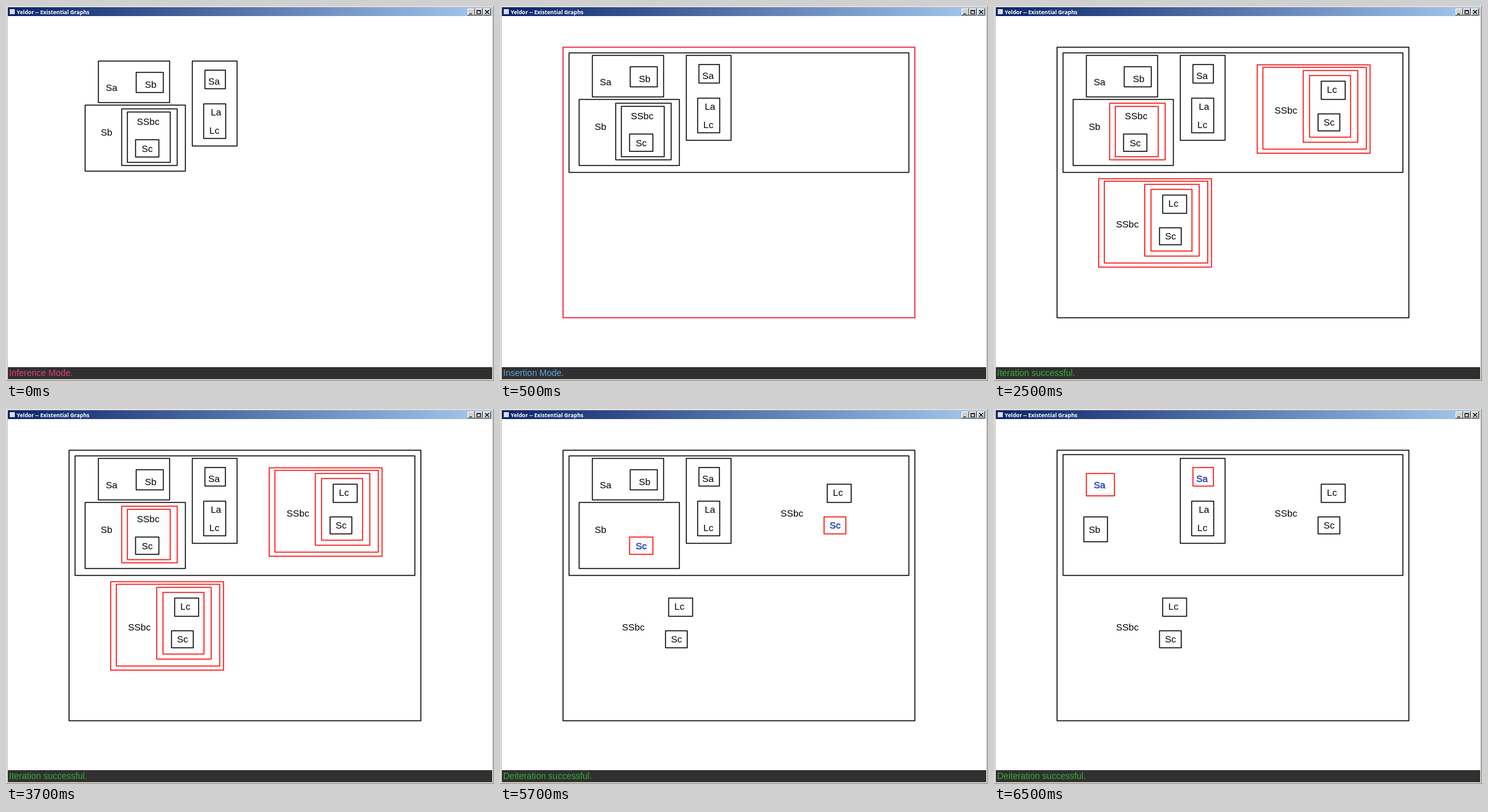
Recreate the animation shown at these times as an HTML page. Size 774 by 596 pixels, loop 8 s.

```html
<!DOCTYPE html>
<html lang="en">
<head>
<meta charset="utf-8">
<title>Existential Graphs</title>
<style>
  html, body { margin: 0; width: 100%; height: 100%; overflow: hidden; background: #d4d0c8; }
  svg { display: block; width: 774px; height: 596px; }
  .box { fill: none; stroke-width: 1.5; stroke-linejoin: round; }
  .label { font: 15px "Liberation Sans", Arial, sans-serif; text-anchor: middle; }
  .status { font: 14px "Liberation Sans", Arial, sans-serif; }
  .title { font: bold 8.6px "Open Sans", sans-serif; fill: #fff; }
  .scene { visibility: hidden; }
</style>
</head>
<body>
<svg id="stage" viewBox="0 0 774 596">
  <defs>
    <linearGradient id="bar">
      <stop offset="0" stop-color="#0a246a"/>
      <stop offset="1" stop-color="#a6caf0"/>
    </linearGradient>
  </defs>
  <rect width="774" height="596" fill="#d4d0c8"/>
  <path d="M.5 596V.5H774" fill="none" stroke="#e8e5df"/>
  <path d="M773.5 0V595.5H0" fill="none" stroke="#8a8780"/>
  <rect x="3" y="2" width="768" height="14" fill="url(#bar)"/>
  <rect x="6" y="5" width="8" height="8" fill="#d8dee8"/>
  <text class="title" x="17" y="13">Yeldor -- Existential Graphs</text>
  <g id="buttons"></g>
  <rect x="3" y="16" width="768" height="558" fill="#fff"/>
  <rect x="3" y="574" width="768" height="19" fill="#303030"/>
</svg>
<script>
const NS = "http://www.w3.org/2000/svg";
const stage = document.getElementById("stage");
const BLACK = "#000", RED = "#f00", CRIMSON = "#f4002a", BLUE = "#1c3cac", GREEN = "#30b034";
const LOOP = 8000;
let layer;

function add(parent, tag, attrs, text) {
  const el = document.createElementNS(NS, tag);
  for (const key in attrs) el.setAttribute(key, attrs[key]);
  if (text) el.textContent = text;
  return parent.appendChild(el);
}

// Corners are given as left, top, right, bottom.
function box(l, t, r, b, color = BLACK) {
  add(layer, "rect", { class: "box", x: l + .5, y: t + .5, width: r - l, height: b - t, stroke: color });
}

function label(text, x, y, color = BLACK) {
  const attrs = { class: "label", x, y: y + 5, fill: color };
  if (color === BLUE) Object.assign(attrs, { stroke: BLUE, "stroke-width": .4 });
  add(layer, "text", attrs, text);
}

function status(text, color) {
  add(layer, "text", { class: "status", x: 5, y: 588, fill: color }, text);
}

function shifted(dx, dy, draw) {
  const outer = layer;
  layer = add(outer, "g", { transform: `translate(${dx} ${dy})` });
  draw();
  layer = outer;
}

function ifSaThenSb() {
  box(146, 78, 259, 144);
  label("Sa", 167.5, 121);
  box(206, 96, 249, 128);
  label("Sb", 229.5, 116);
}

function sbFrame() {
  box(125, 148, 284, 253);
  label("Sb", 159.5, 192);
}

function scCut(line = BLACK, ink = BLACK) {
  box(205, 203, 242, 230.5, line);
  label("Sc", 224, 217.5, ink);
}

function nestedCuts(color = BLACK) {
  sbFrame();
  box(183, 154, 271, 244, color);
  box(192, 159, 260, 239, color);
  label("SSbc", 225.5, 175);
  scCut();
}

function choice(line = BLACK, ink = BLACK) {
  box(295, 78, 366, 213);
  box(315, 92.5, 347.5, 122, line);
  label("Sa", 330, 110.5, ink);
  box(313, 146, 348, 201);
  label("La", 333, 160);
  label("Lc", 330.5, 189);
}

function frames(top = 74, color = BLACK) {
  box(99.5, 65, 657.5, 495, color);
  box(109, top, 648, 264);
}

function goal(line = BLACK, ink = BLACK) {
  label("SSbc", 463, 166);
  box(518.5, 119, 556.5, 148);
  label("Lc", 536, 133);
  box(513.5, 171, 548, 198, line);
  label("Sc", 531.5, 184.5, ink);
}

function cutGoal() {
  box(417, 93, 596, 233.5, RED);
  box(426, 97, 590, 227, RED);
  box(490, 102, 576.5, 216, RED);
  box(500, 110, 565, 208, RED);
  goal();
}

const below = draw => shifted(-251.5, 181, draw);

const scenes = [
  [0, () => {
    shifted(0, 9, () => { ifSaThenSb(); nestedCuts(); choice(); });
    status("Inference Mode.", "#de3c80");
  }],
  [500, () => {
    frames(74, CRIMSON);
    ifSaThenSb(); nestedCuts(); choice();
    status("Insertion Mode.", "#5aa4e6");
  }],
  [2500, () => {
    frames();
    ifSaThenSb(); nestedCuts(RED); choice();
    cutGoal();
    below(cutGoal);
    status("Iteration successful.", GREEN);
  }],
  [4500, () => {
    frames();
    ifSaThenSb(); sbFrame(); scCut(RED, BLUE); choice();
    goal(RED, BLUE);
    below(goal);
    status("Deiteration successful.", GREEN);
  }],
  [6500, () => {
    frames(72);
    box(146, 102, 190.5, 137.5, RED);
    label("Sa", 167.5, 121, BLUE);
    box(142, 171, 179.5, 210.5);
    label("Sb", 159.5, 192);
    choice(RED, BLUE);
    goal();
    below(goal);
    status("Deiteration successful.", GREEN);
  }]
].map(([start, draw]) => {
  layer = add(stage, "g", { class: "scene" });
  draw();
  return { start, group: layer };
});

const glyphs = [
  [732, "M3 8.5H7"],
  [744, "M3 3H8.5V8.5H3ZM3 3.5H8.5"],
  [757, "M3 2.5L9 8.5M9 2.5L3 8.5"]
];
for (const [x, d] of glyphs) {
  const button = add(document.getElementById("buttons"), "g", { transform: `translate(${x} 4)`, fill: "none" });
  add(button, "rect", { width: 12, height: 11, fill: "#d4d0c8" });
  add(button, "path", { d: "M.5 10V.5H11", stroke: "#fff" });
  add(button, "path", { d: "M11.5 0V10.5H0", stroke: "#404040" });
  add(button, "path", { d, stroke: "#000", "stroke-width": 1.2 });
}

const begin = performance.now();
function tick() {
  const time = (performance.now() - begin) % LOOP;
  const current = scenes.filter(s => s.start <= time).pop();
  for (const s of scenes) s.group.style.visibility = s === current ? "visible" : "hidden";
  requestAnimationFrame(tick);
}
tick();
</script>
</body>
</html>
```
